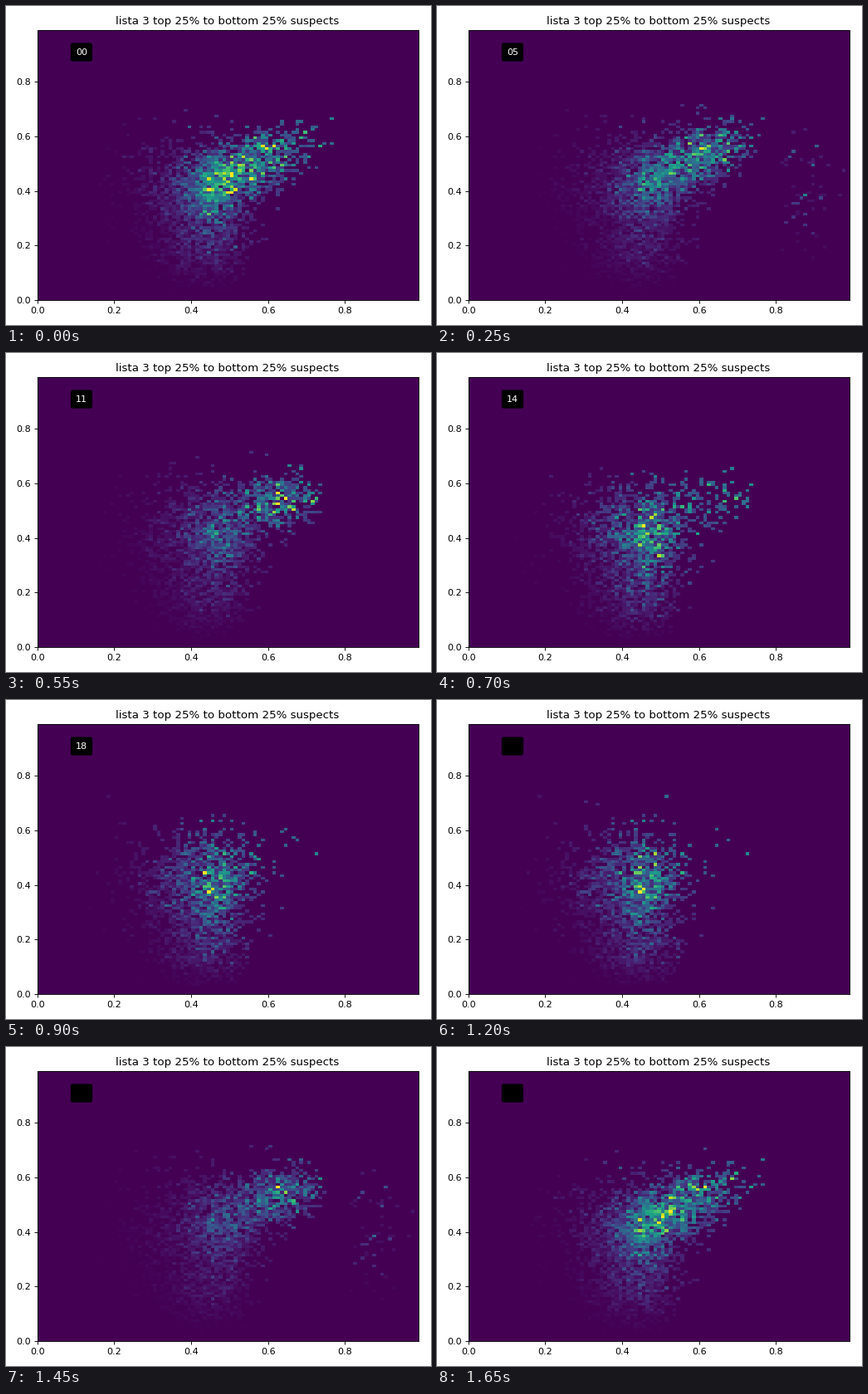
A matplotlib script that plays this animation: 512x384 px, repeating every 1700 ms.

```python
import numpy as np
import matplotlib.pyplot as plt
from matplotlib.animation import FuncAnimation

W, H, DPI = 512, 384, 80
LAST = 22                 # last step counted forward
WINDOW = 3.5              # half width of the sliding time window
EDGES = np.arange(100) * 0.01
STEPS = list(range(LAST + 1)) + list(range(LAST - 1, 0, -2))

rng = np.random.default_rng(11)


def smooth(u, start, end):
    s = np.clip((u - start) / (end - start), 0, 1)
    return s * s * (3 - 2 * s)


def hump(u):
    """Out and back once over the whole run."""
    return np.sin(np.pi * u / 24) ** 2


def times(peak, share=lambda u: 1):
    """Random times, about peak * share(u) of them inside one window."""
    size = int(peak * (LAST + 2 * WINDOW) / (2 * WINDOW))
    u = rng.uniform(-WINDOW, LAST + WINDOW, size)
    return u[rng.random(size) < share(u)]


def ridge():
    """Bright diagonal band that climbs right and then thins out."""
    u = times(1250, lambda u: 1 - .012 * u - .78 * smooth(u, 7.5, 12.5))
    along = rng.normal(0, 1, u.size) * (.098 - .04 * smooth(u, 3, 12))
    across = rng.normal(0, .05, u.size)
    x = .51 + .12 * hump(u) + .75 * along - .66 * across
    y = .46 + .08 * hump(u) + .66 * along + .75 * across
    return u, x, y


def cloud():
    """Wide body with a long left side and a steeper right one."""
    u = times(1400)
    side = rng.normal(0, 1, u.size)
    side *= np.where(side < 0, .09, .055)
    x = .43 + .02 * np.sin(np.pi * u / 18) + side
    y = .38 + .02 * hump(u) + rng.normal(0, .092, u.size)
    return u, x, y


def base():
    u = times(620)
    x = rng.normal(.425, .06, u.size)
    y = rng.normal(.18, .07, u.size) - .0015 * u
    return u, x, y


def strays():
    u = times(90)
    return u, rng.normal(.39, .11, u.size), rng.normal(.46, .12, u.size)


def far_group(n=52):
    """Sparse specks on the right that share one short moment."""
    x = rng.normal(.88, .035, n)
    y = rng.normal(.39, .11, n)
    faint = np.where(np.arange(n) < 15, 1, .25)
    return rng.uniform(6.5, 7.5, n), x, y, weight(x, y) * faint


def weight(x, y):
    return x ** 2 * y


def build():
    u, x, y = (np.concatenate(p)
               for p in zip(ridge(), cloud(), base(), strays()))
    keep = (y > .035) & (y < .73) & (x > .12) & (x < .51 + .45 * y)
    u, x, y = u[keep], x[keep], y[keep]
    w = weight(x, y) * rng.uniform(.8, 1.2, x.size)
    return [np.concatenate(p) for p in zip((u, x, y, w), far_group())]


U, X, Y, WEIGHTS = build()


def density(t):
    now = np.abs(U - t) < WINDOW
    grid, _, _ = np.histogram2d(X[now], Y[now], bins=[EDGES, EDGES],
                                weights=WEIGHTS[now])
    return grid.T / (grid.max() * .93)


fig = plt.figure(figsize=(W / DPI, H / DPI), dpi=DPI)
ax = fig.add_axes([37.57 / W, 30 / H, 459 / W, 325 / H])
image = ax.imshow(density(0), origin="lower", extent=(0, .99, 0, .99),
                  aspect="auto", interpolation="nearest",
                  cmap="viridis", vmin=0, vmax=1)
ax.set_xticks(np.arange(0, .9, .2))
ax.set_yticks(np.arange(0, .9, .2))
ax.set_title("lista 3 top 25% to bottom 25% suspects", fontsize=12)
label = ax.text(.1, .9, "00", color="white", fontsize=10,
                bbox=dict(facecolor="black", edgecolor="black",
                          boxstyle="round,pad=0.5,rounding_size=0.18"))


def draw(i):
    t = STEPS[i]
    image.set_data(density(t))
    # On the way back only the empty box stays
    label.set_text(f"{t:02d}")
    label.set_color("white" if i <= LAST else "black")
    return image, label


anim = FuncAnimation(fig, draw, frames=len(STEPS), interval=50,
                     repeat=True, repeat_delay=0, blit=False)
plt.show()
```
